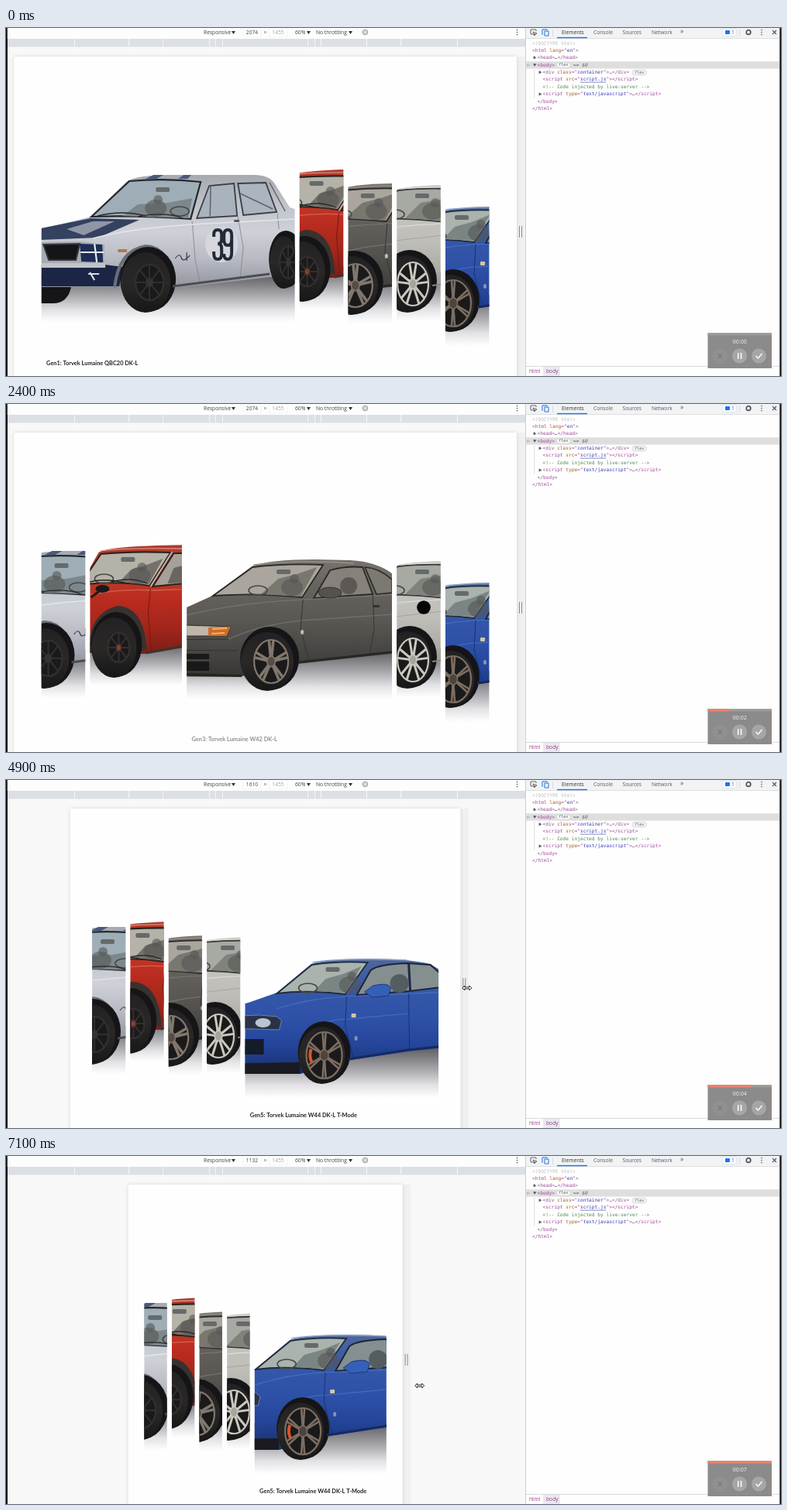
These frames come from a looping animation (1000x450 px, 7.2 s). An HTML page with a canvas:

```html
<!DOCTYPE html>
<html lang="en">
<head>
<meta charset="utf-8">
<title>Expanding panels</title>
<style>
html, body { margin: 0; width: 100%; height: 100%; overflow: hidden; background: #f8f8f9; }
canvas { display: block; width: 1000px; height: 450px; }
</style>
</head>
<body>
<canvas id="stage" width="1000" height="450"></canvas>
<script>
const ctx = document.getElementById('stage').getContext('2d');
const LOOP = 7200, STEP = 100, MID = 334.6;
const UI = '"Open Sans", sans-serif', MONO = '"DejaVu Sans Mono", monospace';
const clamp = v => Math.max(0, Math.min(1, v));

// cubic-bezier(.42, 0, 1, 1)
function easeIn(x) {
  x = clamp(x);
  let lo = 0, hi = 1;
  for (let i = 0; i < 20; i++) {
    const s = (lo + hi) / 2;
    const at = 1.26 * s * (1 - s) ** 2 + 3 * s * s * (1 - s) + s ** 3;
    if (at < x) lo = s; else hi = s;
  }
  return lo * lo * (3 - 2 * lo);
}

// value k of a keyframe list at time t
function track(keys, t, k = 1) {
  if (t <= keys[0][0]) return keys[0][k];
  for (let i = 1; i < keys.length; i++) {
    const a = keys[i - 1], b = keys[i];
    if (t <= b[0]) return a[k] + (b[k] - a[k]) * (t - a[0]) / (b[0] - a[0]);
  }
  return keys[keys.length - 1][k];
}

function rect(x, y, w, h, fill) { ctx.fillStyle = fill; ctx.fillRect(x, y, w, h); }
function shape(d, fill, line, width = 1) {
  const p = new Path2D(d);
  if (fill) { ctx.fillStyle = fill; ctx.fill(p); }
  if (line) { ctx.strokeStyle = line; ctx.lineWidth = width; ctx.stroke(p); }
}
function oval(x, y, rx, ry, fill, line, width = 1) {
  ctx.beginPath();
  ctx.ellipse(x, y, rx, ry, 0, 0, 7);
  if (fill) { ctx.fillStyle = fill; ctx.fill(); }
  if (line) { ctx.strokeStyle = line; ctx.lineWidth = width; ctx.stroke(); }
}
function box(x, y, w, h, r, fill, line, width = 1) {
  ctx.beginPath();
  ctx.roundRect(x, y, w, h, r);
  if (fill) { ctx.fillStyle = fill; ctx.fill(); }
  if (line) { ctx.strokeStyle = line; ctx.lineWidth = width; ctx.stroke(); }
}
function text(s, x, y, color, size = 6.7, font = UI, style = '', align = 'left') {
  ctx.font = `${style} ${size}px ${font}`;
  ctx.textAlign = align;
  ctx.textBaseline = 'middle';
  ctx.fillStyle = color;
  ctx.fillText(s, x, y);
}
function fade(y0, y1, ...colors) {
  const g = ctx.createLinearGradient(0, y0, 0, y1);
  colors.forEach((c, i) => g.addColorStop(i / (colors.length - 1), c));
  return g;
}
const ground = (y0, y1) => rect(0, y0, 700, y1 - y0, fade(y0, y1, '#5c5c60', '#85858a', '#b2b2b6', '#e2e2e5', '#fefefe'));

// split spreads each spoke into two arms
function wheel(x, y, rx, ry, rim) {
  const { dx = 3, w, h, n = 0, color = '#252527', hub = '#333', thick = 4, split = 0 } = rim;
  oval(x + 3, y - 4, rx + 4, ry + 3, '#151517');
  oval(x, y, rx, ry, fade(y - ry, y + ry, '#232222', '#2a2827', '#171717'));
  oval(x + dx, y, w, h, '#1b1a1a', color, 2.2);
  ctx.strokeStyle = color;
  ctx.lineWidth = thick;
  for (let i = 0; i < n; i++) {
    const a = i / n * 2 * Math.PI - Math.PI / 2;
    for (const b of [a - split, a + split]) {
      ctx.beginPath();
      ctx.moveTo(x + dx, y);
      ctx.lineTo(x + dx + w * Math.cos(b), y + h * Math.sin(b));
      ctx.stroke();
    }
  }
  oval(x + dx, y, w * .24, h * .24, hub, color, 1.5);
}
// steering wheel, mirror and seat behind the windscreen
function cabin(x, y, mx, my, seat) {
  ctx.globalAlpha = .6;
  oval(seat, y - 4, 14, 11, '#565856');
  oval(seat + 3, y - 15, 6, 6, '#565856');
  ctx.globalAlpha = 1;
  oval(x, y, 12, 6, null, '#4a4947', 1.6);
  box(mx - 9, my - 3, 18, 6, 2, '#666a6a');
}

const cars = [
  { mid: 209, name: 'Gen1: Torvek Lumaine QBC20 DK-L', draw() {
    ground(318, 380);
    shape('M45 334H84Q80 356 60 356H45Z', '#151517');
    shape('M30 268 45 260 109 244 155 199Q165 191 205 190H320Q340 190 347 202L366 232 385 238V322H340L212 337 150 335H30Z',
      fade(190, 336, '#a6a9af', '#bfc2c9', '#cfd1d8', '#b8bac3', '#92949d'));
    shape('M45 259 109 246 172 248 119 271 45 274Z', '#34415f');
    shape('M78 260 112 250 140 250 100 268Z', '#8f96a6');
    shape('M180 195 190 190H203L194 195ZM222 195 229 190H239L234 195Z', '#4a5a7c');
    shape('M110 244 159 198Q205 194 251 199L238 247Q170 242 110 244Z', '#9faeb6', '#24282c', 2.2);
    shape('M150 243 170 228 208 226 240 220 235 246Z', '#7d888d');
    cabin(224, 237, 202, 209, 193);
    shape('M118 243Q150 235 180 243M170 244Q205 237 228 246', null, '#25282c', 1.3);
    shape('M246 246 262 204 294 201 298 243Z', '#a9b3bd', '#3b3e43', 1.8);
    shape('M299 201 335 200 349 238 306 242Z', '#abb5bf', '#3b3e43', 1.8);
    shape('M264 204 263 245M302 214 344 234M340 200 360 237', null, '#60646c', 1.5);
    shape('M240 250 244 300 250 328M299 244 306 284 302 322M350 240 352 260', null, '#85878f', .9);
    shape('M112 272Q170 256 298 251L372 247', null, '#e4e6ea', 1.4);
    oval(278, 280, 21, 23, '#d5d7dd');
    shape('M268 270v-3q0-6 5-6t5 6v6q0 6-5 6q5 0 5 6v7q0 7-5 7t-5-7v-3M291 273q0 8-5 8t-5-8v-5q0-7 5-7t5 7v22q0 9-5 9t-5-7', null, '#252a38', 4);
    box(294, 248, 7, 3, 1, '#55585f');
    shape('M45 277 97 276 127 280 126 304H45Z', '#a7aab2');
    shape('M48 280 95 279 90 300 55 300Z', '#131519', '#33363c', 2);
    shape('M95 279 124 280 125 303 97 302Z', '#1d2d56');
    shape('M114 279 117 303M96 290H126', null, '#e5e8ee', 2.2);
    shape('M45 306H127L151 309 146 334H45Z', '#1b2546');
    shape('M45 304H128V310H45Z', '#c0c3ca');
    shape('M108 316 114 326M106 318H120', null, '#d9dde7', 2.2);
    box(144, 286, 12, 4, 1, '#b07a52');
    shape('M218 298Q224 290 226 297T237 294M233 290V301', null, '#3c3f46', 1.2);
    shape('M140 335Q145 288 180 282 211 283 216 332', null, '#6c6e76', 4);
    wheel(180, 329, 32, 39, { dx: 5, w: 18, h: 23, n: 8, color: '#303033', thick: 1.6 });
    wheel(358, 303, 18, 34, { dx: 6, w: 11, h: 21, n: 8, color: '#303033', thick: 1.6 });
    shape('M215 334 340 318', null, '#4c4d54', 3);
  } },
  { mid: 362, name: 'Gen2: Torvek Lumaine QBC30 DK-L', draw() {
    ground(308, 364);
    shape('M190 330V282L235 262 288 237 313 192Q325 183 435 182L480 188 510 222 540 235V305L470 306 435 311 372 323 300 322Z',
      fade(182, 324, '#b13a2c', '#c43c2b', '#b92c1f', '#a3261b', '#781f18'));
    shape('M289 234 316 194Q355 190 406 192L379 235Q335 228 289 234Z', '#b5b2a8', '#2b2420', 2.2);
    shape('M340 230 355 214 375 208 396 200 378 233Z', '#75716a');
    cabin(320, 226, 351, 201, 366);
    shape('M298 231Q320 224 350 232M330 230Q355 223 376 232', null, '#22201e', 1.3);
    shape('M383 236 410 193H435L478 195 497 223 455 229Z', '#a5a198', '#28231f', 2);
    shape('M402 232 410 212 425 208 436 230Z', '#6a655e');
    shape('M408 191 380 236', null, '#c9c1b8', 1.5);
    shape('M315 190Q360 184 480 189', null, '#d9a396', 1.2);
    shape('M289 249Q340 238 382 241L540 235', null, '#d8604f', 1.3);
    shape('M380 239 377 270 381 320M460 230 463 270 457 306', null, '#75170f', 1);
    shape('M303 250 314 242', null, '#1c1a19', 3);
    oval(318, 239, 9, 5, '#1b1a1a');
    shape('M205 280H245V300H205Z', '#33302e');
    shape('M300 322Q300 270 337 261 372 262 375 318L361 320 300 322Z', '#37322f');
    wheel(333, 315, 29, 39, { dx: 6, w: 14, h: 19, n: 8, color: '#33302f', hub: '#8e3a2c', thick: 1.6 });
    wheel(500, 300, 20, 34, { w: 12, h: 19, n: 8, color: '#33302f', thick: 1.6 });
    shape('M374 322 435 311 475 306', null, '#42302a', 3);
  } },
  { mid: 366.5, name: 'Gen3: Torvek Lumaine W42 DK-L', draw() {
    ground(318, 381);
    shape('M195 350V280L234 263 267 248 318 210Q340 201 400 201L445 202Q480 204 500 220L540 245V318L497 323 377 336 305 352Z',
      fade(201, 352, '#77736e', '#66635f', '#5c5955', '#4a4845', '#383634'));
    shape('M268 248 319 211Q360 206 410 208L383 250Q320 244 268 248Z', '#aaa69d', '#2b2927', 1.8);
    shape('M330 246 352 226 376 220 402 211 381 249Z', '#7a776f');
    cabin(326, 241, 359, 217, 370);
    shape('M398 251 419 215Q440 209 461 211L474 246Z', '#86827b', '#2a2826', 1.8);
    shape('M464 211Q482 212 499 227V244L479 246Z', '#7c7973', '#2a2826', 1.6);
    oval(443, 235, 11, 11, '#5c5954');
    shape('M320 208Q380 201 450 206', null, '#97928a', 1.3);
    shape('M234 273Q300 257 383 253L510 246M288 304Q330 285 382 280L500 272', null, '#7b7771', 1.2);
    shape('M384 253 381 290 391 330M474 247 476 290 470 324', null, '#363432', 1);
    oval(419, 244, 15, 7, '#55524e', '#353331');
    box(474, 260, 9, 3, 1, '#35332f');
    oval(383, 295, 2, 3, '#c3beb4');
    shape('M205 289 234 286 263 287 291 288 286 300H205Z', '#beb7a9', '#2f2d2b');
    shape('M262 289 291 288 285 300H262Z', '#cf6b29');
    shape('M267 291 286 290M266 297 283 296', null, '#f2b25e', 2);
    shape('M195 305 288 304M195 318 300 319', null, '#353330', 1.2);
    shape('M205 323H263V330H205ZM205 333H263V345H205Z', '#191919');
    shape('M195 347 305 350V353L195 352Z', '#252423');
    wheel(338, 333, 34, 38, { dx: 5, w: 22, h: 28, n: 5, color: '#81776d', hub: '#554e47', thick: 3.6, split: .13 });
    shape('M378 334 497 321 540 316', null, '#282725', 3);
  } },
  { mid: 352, name: 'Gen4: Torvek Lumaine W43 DK-L', draw() {
    ground(316, 379);
    shape('M180 345V280L234 260 264 248 318 209Q340 203 400 203 450 204 480 214L520 240V314L470 320 362 336 310 352 234 349Z',
      fade(203, 350, '#c2c0ba', '#c5c3bd', '#bfbdb7', '#adaba5', '#8e8c87'));
    shape('M265 248 321 210Q360 206 408 209L381 251Q325 244 265 248Z', '#a6aaa3', '#35383a', 1.8);
    shape('M330 246 350 226 374 222 401 213 380 249Z', '#7f837b');
    cabin(317, 241, 352, 217, 366);
    shape('M396 251 414 216Q432 211 454 212L465 247Z', '#858982', '#303335', 1.8);
    shape('M457 212Q476 214 496 233L497 243 469 246Z', '#80847d', '#303335', 1.6);
    oval(434, 236, 11, 11, '#5a5d58');
    shape('M322 208Q370 203 450 208M234 270Q310 255 380 253L520 244', null, '#dcdad3', 1.4);
    shape('M280 280Q330 273 380 268L490 260', null, '#a5a49e', 1);
    shape('M381 253 377 286 388 330M465 248 468 290 462 320', null, '#85847e', 1);
    oval(413, 244, 14, 7, '#c2c1bb', '#73736f');
    oval(379, 286, 3.5, 3.5, '#e1802b');
    oval(378, 307, 1.7, 2.5, '#77726c');
    shape('M190 288 234 286 262 284 294 292 289 298H190Z', '#3c3e3d', '#696a66', 1.5);
    oval(272, 291, 8, 4, '#c8ccc9');
    oval(247, 291, 10, 4, '#a5aaa7');
    shape('M180 305 300 306', null, '#888782', 1);
    shape('M190 321 255 320V334L190 333ZM296 318 309 320V336L294 335Z', '#20201f');
    oval(263, 327, 4, 4, '#d36732', '#373431', 2);
    shape('M180 337 234 339 312 337V351L234 349 180 345Z', '#292927');
    wheel(333, 331, 31, 37, { dx: 7, w: 20, h: 28, n: 5, color: '#cbc8c0', hub: '#a8a59d', thick: 3, split: .22 });
    shape('M365 333 470 318 520 312', null, '#85837d', 2);
  } },
  { mid: 405.7, name: 'Gen5: Torvek Lumaine W44 DK-L T-Mode', draw() {
    ground(345, 411);
    shape('M235 372V300L285 288 322 275 366 238Q390 231 440 231 490 231 520 238L575 272V342L491 351 411 363 352 380H235Z',
      fade(231, 380, '#4f679c', '#3558a8', '#2f52a9', '#24459a', '#172f6c'));
    shape('M322 276 367 239Q400 234 439 236L410 277Q360 271 322 276Z', '#aab3ad', '#202b3c', 1.8);
    shape('M370 273 385 257 407 251 431 241 410 275Z', '#7a8584');
    cabin(362, 269, 394, 245, 416);
    shape('M425 278 443 246Q453 238 491 237L520 239 550 266 493 273Z', '#858f90', '#1c2638', 2);
    shape('M492 237 494 273', null, '#1e2a44', 3);
    oval(480, 263, 12, 12, '#545d60');
    shape('M368 236Q400 230 490 233', null, '#8b9fc8', 1.4);
    shape('M321 296Q365 282 410 280L570 273M360 324Q386 309 415 309L491 302', null, '#4a6fc0', 1.2);
    shape('M412 280 410 318 421 360M492 276 493 350', null, '#183274', 1);
    shape('M435 274 446 266Q466 261 469 269L466 279 445 281Z', '#3560b8', '#1b397d');
    box(418, 302, 6, 5, 1, '#d7c7a1');
    oval(424, 334, 2, 3, '#8795b5');
    shape('M250 306 300 304 322 306 328 311 325 323 255 321Z', '#2a3346', '#7082a5');
    oval(304, 314, 10, 6, '#bac5d2');
    shape('M250 335H305V355H250Z', '#141b2a');
    shape('M235 367 352 365V380H235Z', '#191b21');
    wheel(380, 356, 30, 37, { dx: 3, w: 23, h: 30, n: 6, color: '#7c6e62', hub: '#4d443e', thick: 2.6, split: .09 });
    shape('M366 348Q363 357 367 365', null, '#d9552b', 4);
    shape('M414 361 491 349 575 340', null, '#152a62', 3);
  } }
];

const clicks = [-5000, 938, 1802, 2805, 3738];
const widths = [[4550, 2074], [4800, 1830], [5500, 288], [5900, 288], [6400, 440], [7100, 1132]];
const pointer = [[100, 960, 425], [850, 405, 262], [1300, 447, 264], [1800, 475, 264], [2400, 539, 263],
  [2800, 541, 263], [3200, 585, 263], [3740, 600, 263], [4100, 659, 258], [4500, 664, 262]];
const dragging = [[4500, 2, 262], [5600, 6, 281], [6400, 8, 286], [7100, 17, 297]];

function page(t, css) {
  const w = css * .3128, left = MID - w / 2, right = left + w, phone = css < 480;
  rect(2, 25, 668, 425, '#f8f8f9');
  rect(right, 37, 10.5, 413, '#f0f0f2');
  ctx.save();
  ctx.shadowColor = '#0002';
  ctx.shadowBlur = 5;
  box(left, 37, w, 430, 2, '#fefefe');
  ctx.restore();
  rect(right + 3, 256, 1, 15, '#8b8b8e');
  rect(right + 6, 256, 1, 15, '#8b8b8e');

  const gap = 6.25, count = phone ? 3 : 5;
  const span = phone ? w - 11.5 : w * .9 - gap;
  const grow = clicks.map((c, i) => easeIn((t - c) / 700) - (i < 4 ? easeIn((t - clicks[i + 1]) / 700) : 0));
  const unit = (span - gap * (count - 1)) / (phone ? 3 : 9.79);
  const active = clicks.filter(c => c <= t).length - 1;
  let x = phone ? left + 4 : MID - span / 2;
  for (let i = 0; i < count; i++) {
    const pw = unit * (phone ? 1 : 1 + 4.79 * grow[i]);
    ctx.save();
    ctx.beginPath();
    ctx.rect(x, 160, pw, 290);
    ctx.clip();
    ctx.translate(x + pw / 2 + 8 * Math.max(0, 1 - pw / 130), 0);
    if (phone) { ctx.translate(0, 4.2); ctx.scale(.946, .946); }
    ctx.translate(-cars[i].mid, 0);
    cars[i].draw();
    ctx.restore();
    if (i === active) {
      ctx.globalAlpha = easeIn((t - clicks[i] - 400) / 300);
      text(cars[i].name, x + 6.3, 434, '#222', 7.4, 'Lato, sans-serif', 'bold');
      ctx.globalAlpha = 1;
    }
    x += pw + gap;
  }
  return right + 5;
}

function deviceBar(css) {
  const ink = '#3c4043';
  rect(0, 0, 671, 14, '#fdfdfd');
  rect(2, 14, 668, 10, '#dcdfe5');
  for (const x of [88, 158, 202, 262, 270, 279, 389, 398, 406, 465, 509, 582]) rect(x, 14, 1, 10, '#f5f6f8');
  rect(2, 24, 668, 1, '#eeeff1');
  text('Responsive', 255, 6, ink);
  text('60%', 373, 6, ink);
  text('No throttling', 400, 6, ink);
  for (const x of [291, 388, 442]) shape(`M${x} 4h5l-2.5 4z`, '#303236');
  box(306, 0, 23, 12, 1, '#fff', '#ececee', .7);
  box(340, 0, 23, 12, 1, '#fff', '#ececee', .7);
  text(Math.round(css), 317.5, 6, ink, 6.7, UI, '', 'center');
  text('×', 334.5, 6, '#666', 6.7, UI, '', 'center');
  text('1455', 351, 6, '#a0a2a5', 6.7, UI, '', 'center');
  oval(463.5, 5.5, 3.3, 3.3, null, '#77797c', .8);
  shape('M461.5 5.5 463.5 3.5 465.5 5.5 463.5 7.5Z', null, '#77797c', .8);
  dots(659.5);
}
function dots(x) { for (const y of [2.5, 5.5, 8.5]) oval(x, y, .8, .8, '#4c4f53'); }

// each piece of markup is [text, color]
function code(x, y, parts, arrow) {
  if (arrow === 'open') shape(`M${x - 5.5} ${y - 1.8}h4.4l-2.2 3.6z`, '#55585c');
  if (arrow === 'shut') shape(`M${x - 4.8} ${y - 2.4}v4.4l3.6-2.2z`, '#55585c');
  for (const [s, color = '#a2489b'] of parts) {
    text(s, x, y, color, 6.2, MONO);
    const w = ctx.measureText(s).width;
    if (s === 'script.js') rect(x, y + 3, w, .6, color);
    x += w;
  }
}
function badge(x, y) {
  box(x, y - 3.2, 18.5, 6.6, 3.3, '#f5f5f5', '#c5c7ca', .7);
  text('flex', x + 9.2, y, '#555', 5, MONO, '', 'center');
}

function devtools() {
  const ink = '#55585c', attr = '#a55e25', value = '#3a3ab5', note = '#4e8950', blue = '#1a73e8';
  rect(670, 0, 330, 450, '#fefefe');
  rect(670, 0, 1, 450, '#cacdd1');
  rect(671, 0, 327, 13, '#f1f3f4');
  rect(671, 13, 327, .7, '#cfd2d6');
  shape('M683 8H677V2H684V4M680 5 685 7 683 8 682 10Z', null, ink, .9);
  shape('M692 9V2H699M695 4H700V10H695Z', null, blue, 1);
  rect(705, 2, .7, 9, '#cfd2d6');
  [['Elements', 717], ['Console', 758], ['Sources', 795.5], ['Network', 833]].forEach(([s, x], i) => text(s, x, 6, i ? ink : '#303236'));
  rect(711, 11.8, 39, 1.4, blue);
  text('»', 870, 5, ink, 9);
  box(924, 1, 19, 10, 2, '#f7f8fa', '#d5d8dc', .7);
  box(928, 3, 6, 5, 1, blue);
  text('1', 936, 6, blue);
  rect(946, 2, .7, 9, '#cfd2d6');
  oval(958, 5.5, 2.8, 2.8, null, ink, 1.8);
  dots(975);
  shape('M989 3 994 8M994 3 989 8', null, ink, 1.1);

  rect(671, 43.3, 327, 9.2, '#dedede');
  rect(681.5, 53, .7, 38, '#d0d0d0');
  code(679, 20, [['<!DOCTYPE html>', '#bdbdbd']]);
  code(679, 29.2, [['<html '], ['lang', attr], ['="'], ['en', value], ['">']]);
  code(685.5, 38.5, [['<head>'], ['…', '#555'], ['</head>']], 'shut');
  text('⋯', 672, 48, '#555', 6, MONO);
  code(685.5, 48, [['<body>']], 'open');
  badge(710, 48);
  text('== $0', 732, 48, '#666', 6.2, MONO, 'italic');
  code(692.5, 57.4, [['<div '], ['class', attr], ['="'], ['container', value], ['">'], ['…', '#555'], ['</div>']], 'shut');
  badge(808, 57.4);
  code(692.5, 66.8, [['<script '], ['src', attr], ['="'], ['script.js', value], ['"><\/script>']]);
  code(692.5, 76.3, [['<!-- Code injected by live-server -->', note]]);
  code(692.5, 85.7, [['<script '], ['type', attr], ['="'], ['text/javascript', value], ['">'], ['…', '#555'], ['<\/script>']], 'shut');
  code(685.5, 95.2, [['</body>']]);
  code(679, 104.4, [['</html>']]);

  rect(671, 437, 327, .8, '#cdd0d4');
  rect(693, 438, 22, 12, '#e9eaec');
  text('html', 675, 444.5, '#97358f');
  text('body', 697, 444.5, '#97358f');
}

function recorder(t) {
  rect(905.5, 394.5, 82.5, 45.5, '#8b8b8b');
  rect(905.5, 394.5, 82.5, 3, '#9d9893');
  rect(905.5, 394.5, 82.5 * clamp(t / 7100), 3, '#ee8068');
  text('00:0' + Math.floor(t / 1000), 946.7, 406.5, '#f4f4f4', 7, UI, '', 'center');
  oval(921.5, 424, 9.5, 9.5, '#909090');
  oval(946.5, 424, 9.5, 9.5, '#a6a6a6');
  oval(971.5, 424, 9.5, 9.5, '#a6a6a6');
  shape('M918.5 421 924.5 427M924.5 421 918.5 427', null, '#7b7b7b', 1.2);
  shape('M944.7 420V428M948.5 420V428', null, '#fff', 1.5);
  shape('M967.5 424 970.5 427 975.5 421', null, '#fff', 1.4);
}

function drawPointer(t, handle) {
  if (t < 100) return;
  if (t < 4500) {
    oval(track(pointer, t), track(pointer, t, 2), 8.8, 8.8, '#050505');
    return;
  }
  ctx.save();
  ctx.translate(handle + track(dragging, t), track(dragging, t, 2));
  shape('M-6 0-3-3V-1H3V-3L6 0 3 3V1H-3V3Z', '#fff', '#252525', 1);
  ctx.restore();
}

function frame(now) {
  const t = Math.floor(now % LOOP / STEP) * STEP;
  const css = track(widths, t);
  const handle = page(t, css);
  deviceBar(css);
  devtools();
  recorder(t);
  drawPointer(t, handle);
  rect(0, 0, 1.8, 450, '#111');
  rect(998.3, 0, 1.7, 450, '#111');
}

const start = performance.now();
function tick() {
  frame(performance.now() - start);
  requestAnimationFrame(tick);
}
tick();
</script>
</body>
</html>
```
